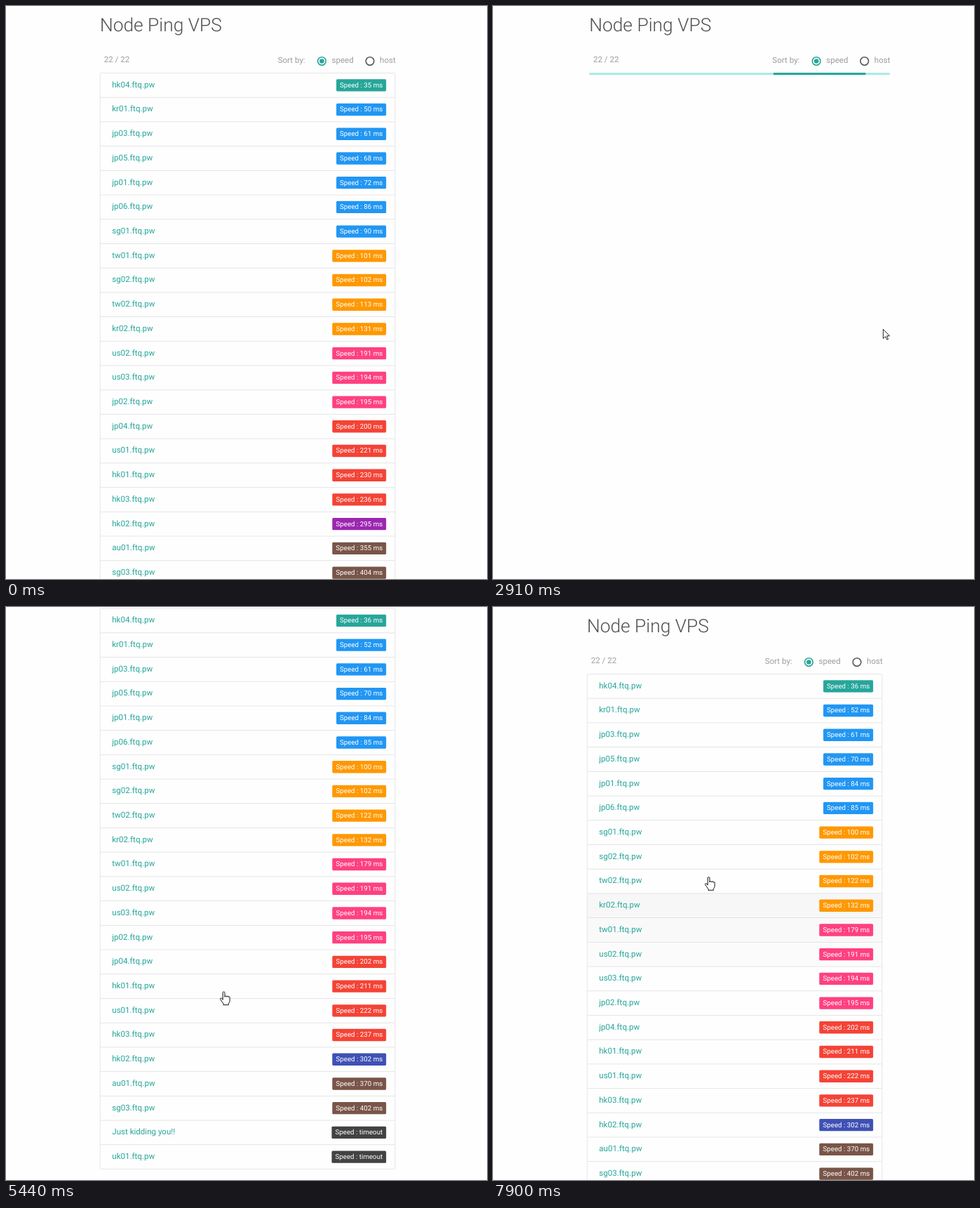
These frames come from a looping animation (686 by 816 pixels, 8000 ms). An HTML page:

```html
<!DOCTYPE html>
<html lang="en">
<head>
<meta charset="utf-8">
<title>Node Ping VPS</title>
<style>
html, body { margin: 0; width: 100%; height: 100%; overflow: hidden; background: #fefefe; }
body { position: relative; }
#stage { position: absolute; left: 0; top: 0; width: 830px; height: 988px; overflow: hidden; transform: scale(.8265); transform-origin: 0 0;
  font: 14px/21px Roboto, sans-serif; color: #9e9e9e; text-rendering: geometricPrecision; }
#page, #page *, .cursor { position: absolute; box-sizing: border-box; white-space: nowrap; }
#page { top: 0; left: 162px; width: 510px; height: 1100px; }
#page.loading { left: 166px; width: 519px; }
h1 { margin: 0; top: 15px; font-size: 31.92px; font-weight: 300; line-height: 35px; color: #505050; }
.count { left: 7px; top: 83px; }
.sort { right: 0; top: 84px; width: 203px; height: 21px; }
.radio { top: 3px; width: 16px; height: 16px; border: 2px solid #5a5a5a; border-radius: 50%; }
.radio.on { border-color: #26a69a; }
.radio.on::after { content: ""; position: absolute; inset: 2px; border-radius: 50%; background: #26a69a; }
#host { left: 151px; }
.bar { top: 115px; width: 100%; height: 4px; border-radius: 2px; overflow: hidden; background: #acece6; }
.bar i { top: 0; bottom: 0; background: #26a69a; }
.list { top: 115px; width: 100%; border: 1px solid #e0e0e0; border-radius: 2px; }
#blank { top: 140px; height: 43px; }
.row { left: 0; right: 0; height: 42px; padding: 10px 20px; border-bottom: 1px solid #e0e0e0; color: #26a69a; }
.row:last-child { border-bottom: 0; }
.badge { top: 10px; right: 15px; height: 21px; padding: 0 6px; border-radius: 2px; font-size: 11.8px; color: #fff; background: #26a69a; }
#blank .badge { width: 310px; }
.cursor { left: 0; top: 0; overflow: visible; fill: #fff; stroke: #111; }
</style>
</head>
<body>
<div id="stage">
  <div id="page">
    <h1 class="text">Node Ping VPS</h1>
    <span class="count text">22 / 22</span>
    <div class="sort">
      <span class="text">Sort by:</span>
      <span class="radio" id="speed"></span><span class="text" style="left:93px">speed</span>
      <span class="radio" id="host"></span><span class="text" style="left:176px">host</span>
    </div>
    <div class="bar" id="bar"><i id="long"></i><i id="short"></i></div>
    <div class="list" id="blank"><div class="row"><span class="badge"></span></div></div>
  </div>
</div>
<svg class="cursor" id="arrow" width="10" height="16"><path transform="scale(.826)" stroke-width="1.1" d="M.5.5V16.5L4.4 13 7 18.5 9.2 17.6 6.8 12H11.6Z"/></svg>
<svg class="cursor" id="hand" width="15" height="20"><path d="M4.2 12V2a1.4 1.4 0 0 1 2.8 0V8q0-1.6 1.4-1.4t1.4 1.4q0-1.4 1.3-1.2t1.3 1.5q.2-1 1-.8t.8 1.6V13q0 2.5-1.8 4.5V19.3H5V17.5Q3 15 .8 11.5q-.6-1.8.8-2 1.2 0 2.6 2.5Z"/></svg>
<script>
const LOOP = 8000, ROW = 42, TOP = 115, SCALE = .8265;
const RELOAD = 1380, READY = 1500, LISTED = 3810, BAR_START = 1263;
const SCROLL_DOWN = 5440, SCROLL_UP = 6550, SCROLL_END = 6680, SCROLL = 113;

// Pointer path: time, x, y
const path = [[RELOAD, 26, 22], [2260, 500, 442], [2650, 556, 460], [2910, 556, 460], [LISTED, 593, 389],
  [4460, 590, 329], [5290, 305, 547], [SCROLL_END, 305, 550], [7240, 304, 451], [7900, 302, 384]];

// Host with its ping before and after the reload
const hosts = ("hk04 35 36,kr01 50 52,jp03 61 61,jp05 68 70,jp01 72 84,jp06 86 85,sg01 90 100,tw01 101 179," +
  "sg02 102 102,tw02 113 122,kr02 131 132,us02 191 191,us03 194 194,jp02 195 195,jp04 200 202,us01 221 222," +
  "hk01 230 211,hk03 236 237,hk02 295 302,au01 355 370,sg03 404 402").split(",").map(s => s.split(" "));

// One colour for every 50 ms
const colors = ["#26a69a", "#2196f3", "#ff9800", "#ff4081", "#f44336", "#9c27b0", "#3f51b5", "#795548"];

const $ = id => document.getElementById(id);
const page = $("page"), texts = document.querySelectorAll(".text");
const show = (el, on) => { el.style.visibility = on ? "visible" : "hidden"; };

function add(parent, cls, text = "") {
  const el = document.createElement("div");
  el.className = cls;
  el.textContent = text;
  return parent.appendChild(el);
}

function buildList(run) {
  const list = add(page, "list");
  const items = hosts.map(h => [h[0] + ".ftq.pw", +h[run]]).sort((a, b) => a[1] - b[1]);
  items.push(["Just kidding you!!"], ["uk01.ftq.pw"]);
  list.style.height = items.length * ROW + 1 + "px";
  items.forEach(([name, ms], i) => {
    const row = add(list, "row", name);
    row.style.top = i * ROW + "px";
    const badge = add(row, "badge", "Speed : " + (ms ? ms + " ms" : "timeout"));
    badge.style.background = ms ? colors[Math.min(7, Math.floor(ms / 50))] : "#424242";
  });
  return list;
}

const oldList = buildList(1), newList = buildList(2);

function sweep(el, from, to, easing, delay) {
  const a = el.animate([
    { left: from[0], right: from[1], easing },
    { left: to[0], right: to[1], offset: .6 },
    { left: to[0], right: to[1] }
  ], { duration: 2100, delay, iterations: Infinity, fill: "both" });
  a.pause();
  return a;
}

const sweeps = [
  sweep($("long"), ["-35%", "100%"], ["100%", "-90%"], "cubic-bezier(.65,.815,.735,.395)", 0),
  sweep($("short"), ["-200%", "100%"], ["107%", "-8%"], "cubic-bezier(.165,.84,.44,1)", 1150)];

function pointer(t) {
  const next = path.findIndex(p => p[0] > t);
  const i = next < 0 ? path.length - 1 : Math.max(1, next);
  const [t0, x0, y0] = path[i - 1], [t1, x1, y1] = path[i];
  const k = Math.min(1, Math.max(0, (t - t0) / (t1 - t0)));
  return [x0 + (x1 - x0) * k, y0 + (y1 - y0) * k];
}

// Rows the moving pointer has just left keep a faint tint
function tintRows(t, y) {
  const dy = y - pointer(t - 150)[1];
  const dir = Math.abs(dy) > 5 ? Math.sign(dy) : 0;
  const over = Math.floor((y / SCALE - TOP) / ROW);
  [...newList.children].forEach((row, i) => {
    const behind = (over - i) * dir;
    const alpha = behind > 0 && behind < 4 ? .035 - .008 * behind : 0;
    row.style.background = `rgba(0,0,0,${alpha})`;
  });
}

function scrollAt(t) {
  if (t < SCROLL_DOWN || t >= SCROLL_END) return 0;
  return t < SCROLL_UP ? SCROLL : SCROLL / 2;
}

function render(t) {
  const loading = t >= RELOAD && t < LISTED, bare = loading && t < READY;
  page.className = loading ? "loading" : "";
  page.style.top = -scrollAt(t) + "px";
  texts.forEach(el => show(el, !bare));
  $("speed").className = bare ? "radio" : "radio on";
  $("speed").style.left = bare ? "62px" : "68px";
  show($("bar"), loading);
  show($("blank"), bare);
  show(oldList, t < RELOAD);
  show(newList, t >= LISTED);
  sweeps.forEach(a => { a.currentTime = loading && !bare ? t - BAR_START : 0; });

  const [x, y] = pointer(t), hand = t > LISTED && x < 555;
  show($("arrow"), t >= RELOAD && !hand);
  show($("hand"), hand);
  (hand ? $("hand") : $("arrow")).style.transform = `translate(${x}px, ${y}px)`;
  tintRows(t, y);
}

function loop() {
  render(performance.now() % LOOP);
  requestAnimationFrame(loop);
}
loop();
</script>
</body>
</html>
```
